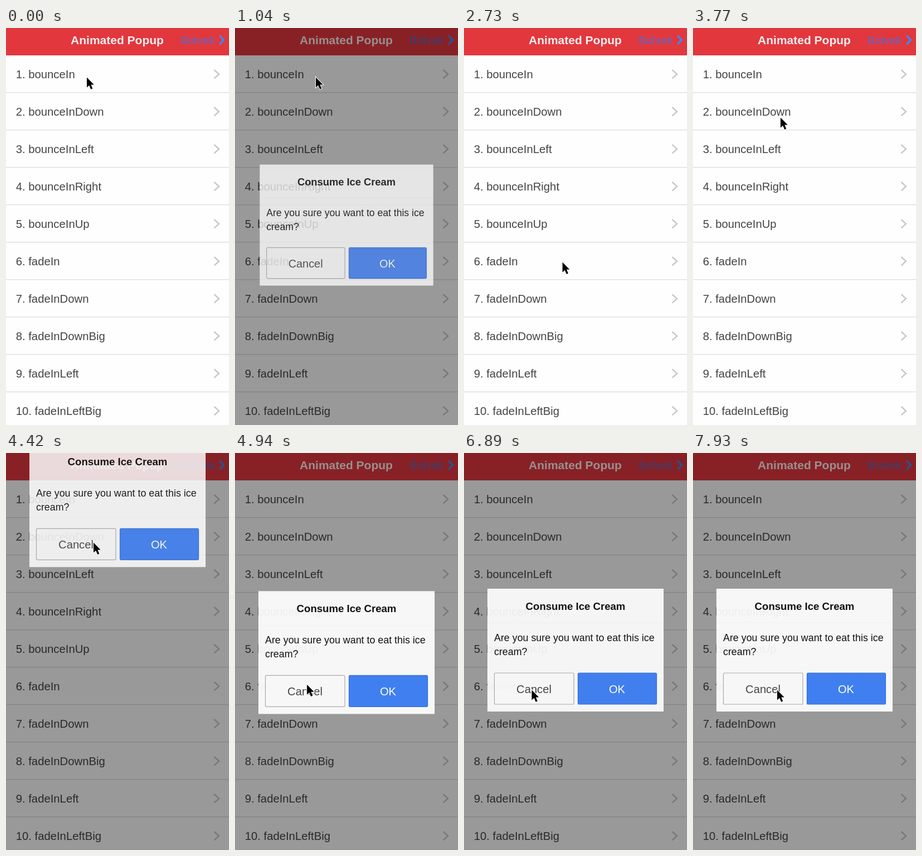
An HTML page for the animation above (8000 ms loop, 400 by 711 pixels).

```html
<!DOCTYPE html>
<html lang="en">
<head>
<meta charset="utf-8">
<title>Animated Popup</title>
<style>
  html, body { margin: 0; width: 100%; height: 100%; overflow: hidden; background: #fff; }
  svg { display: block; font: 20.3px "Liberation Sans", Arial, sans-serif; fill: #444; }
  .mid { text-anchor: middle; }
  .bold { font-weight: bold; }
  .chevron { fill: none; stroke: #c7c7cb; stroke-width: 2.4; }
</style>
</head>
<body>
<svg width="400" height="711" viewBox="0 0 400 711">
  <rect width="400" height="711" fill="#fefefe"/>
  <g id="list"></g>
  <rect width="400" height="49" fill="#e2373d"/>
  <text class="mid bold" x="199.500" y="29" font-size="21" fill="#fff" fill-opacity=".92">Animated Popup</text>
  <text x="313" y="29" font-size="20.5" fill="#5f68c6">Bolvek</text>
  <path d="M383 13.500l7.500 8-7.500 8" fill="none" stroke="#3f86f2" stroke-width="3.4"/>
  <rect id="shade" width="400" height="711" fill="#000"/>
  <g id="popup">
    <rect x="42" y="243" width="316" height="220" fill="#fff" fill-opacity=".92"/>
    <rect x="42" y="303.500" width="316" height="1" fill="#000" fill-opacity=".03"/>
    <g fill="#111">
      <text class="mid bold" x="200" y="280.500" font-size="18.6">Consume Ice Cream</text>
      <g font-size="17.85">
        <text x="54" y="336.500">Are you sure you want to eat this ice</text>
        <text x="54" y="362">cream?</text>
      </g>
    </g>
    <rect x="54.500" y="394" width="142.500" height="56" rx="2" fill="#f8f8f8" fill-opacity=".8" stroke="#aaa" stroke-width="1.2"/>
    <rect x="204.500" y="394" width="141" height="56" rx="2" fill="#407ff0" stroke="#3470d8" stroke-width="1.2"/>
    <g class="mid" font-size="20.2">
      <text x="125.500" y="430">Cancel</text>
      <text x="274.500" y="430" fill="#fff">OK</text>
    </g>
  </g>
  <path id="cursor" d="M0 0V18L4.200 14.200L7.200 21.200L10.300 19.900L7.400 13H12.800Z" fill="#000" stroke="#fff" stroke-width="2" paint-order="stroke"/>
</svg>
<script>
const LOOP = 8000, STEP = 130;
const $ = id => document.getElementById(id);

const effects = ['bounceIn', 'bounceInDown', 'bounceInLeft', 'bounceInRight', 'bounceInUp',
  'fadeIn', 'fadeInDown', 'fadeInDownBig', 'fadeInLeft', 'fadeInLeftBig'];
$('list').innerHTML = effects.map((name, i) => `<g transform="translate(0 ${49 + 67 * i})">
  <text x="17.700" y="41">${i + 1}. ${name}</text>
  <path class="chevron" d="M373.500 26l8.500 7.700-8.500 7.700"/>
  <rect y="66" width="400" height="1.300" fill="#dcdcde"/></g>`).join('');

const clamp = x => Math.max(0, Math.min(1, x));
const smooth = x => x * x * (3 - 2 * x);

// cubic-bezier(.215, .61, .355, 1)
function easeOut(x) {
  const curve = (s, a, b) => 3 * (1 - s) ** 2 * s * a + 3 * (1 - s) * s * s * b + s ** 3;
  let lo = 0, hi = 1;
  for (let i = 0; i < 24; i++) {
    const s = (lo + hi) / 2;
    if (curve(s, .215, .355) < x) lo = s; else hi = s;
  }
  return curve(lo, .61, 1);
}

// Value at t of a list of [time, value] keys
function track(keys, t, ease) {
  const i = keys.findIndex(k => k[0] > t);
  if (i < 0) return keys[keys.length - 1][1];
  if (i === 0) return keys[0][1];
  const [t0, a] = keys[i - 1], [t1, b] = keys[i];
  return a + (b - a) * ease((t - t0) / (t1 - t0));
}

const bounce = [[0, .3], [.2, 1.1], [.4, .9], [.6, 1.03], [.8, .97], [1, 1]];
const drop = [[0, -3000], [.6, 25], [.75, -10], [.9, 5], [1, 0]];
const shows = [
  { start: 793, end: 2500, fade: .6, scale: bounce },
  { start: 4088.2, end: 5270, fade: .6, shift: drop },
  { start: 6080, end: 9000, fade: 1 }
];

const cursorX = [[0, 145], [1250, 145], [2080, 177], [2650, 177], [3640, 157],
  [4480, 157], [5000, 128], [5300, 128], [5650, 118], [6760, 118], [7400, 151]];
const cursorY = [[0, 88.5], [1250, 88.5], [2080, 424.5], [2650, 424.5], [3640, 160.5],
  [4480, 160.5], [5000, 424.5]];

function draw(t) {
  let shade = 0, alpha = 0, scale = 1, shift = 0;
  const show = shows.find(s => t >= s.start - 60 && t < s.end + 100);
  if (show) {
    const p = (t - show.start) / 1000, out = clamp((t - show.end) / 100);
    shade = .4 * clamp((t - show.start + 60) / 100) * (1 - out);
    alpha = easeOut(clamp(p / show.fade)) * (1 - out);
    if (show.scale) scale = track(show.scale, p, easeOut);
    if (show.shift) shift = track(show.shift, p, easeOut);
    scale *= 1 - .2 * out;
  }
  $('shade').setAttribute('opacity', shade);
  $('popup').setAttribute('opacity', alpha);
  $('popup').setAttribute('transform', `translate(200 ${353 + shift}) scale(${scale}) translate(-200 -353)`);
  $('cursor').setAttribute('transform',
    `translate(${track(cursorX, t, smooth)} ${track(cursorY, t, smooth)})`);
}

const begin = performance.now();
function tick() {
  const t = (performance.now() - begin) % LOOP;
  draw(Math.floor(t / STEP) * STEP);
  requestAnimationFrame(tick);
}
tick();
</script>
</body>
</html>
```
